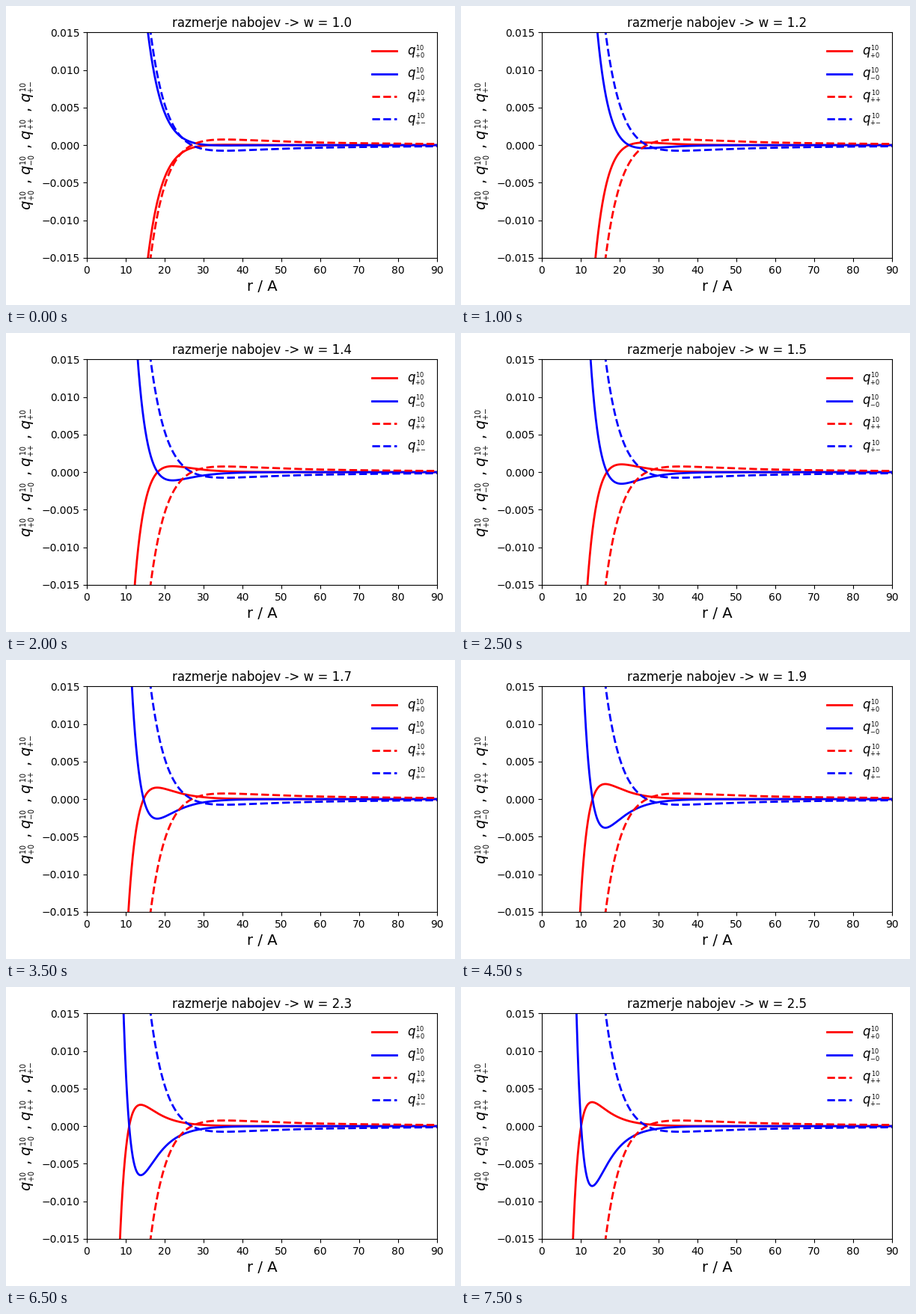
Recreate the animation shown at these times as a matplotlib script. Size 600 px wide and 400 px high, loop 8000 ms.

```python
import numpy as np
import matplotlib.pyplot as plt
from matplotlib.animation import FuncAnimation

FRAMES, INTERVAL = 16, 500
BETA = 0.2165          # screening rate, 1/A
TAIL, CORE = 0.131, 0.895

r = np.linspace(2, 90, 1500)


def neutral(r, w):
    """Response of the + particle next to a neutral one at charge ratio w."""
    slow, fast = np.exp(-BETA * r), np.exp(-w * BETA * r)
    if abs(w - 1) < 1e-9:
        tail = BETA * r * slow
    else:
        tail = (slow - fast) / (w - 1)
    return TAIL * tail - CORE * w * fast


def charged(r):
    """Response of the + particle next to a charged one."""
    return 1.25 / r**2 - 0.849 * np.exp(-r / 4.35)


def label(a, b):
    # small stacked indices
    return rf"$q\genfrac{{}}{{}}{{0}}{{2}}{{10}}{{{{{a}}}{{{b}}}}}$"


plt.rcParams["font.family"] = "DejaVu Sans"
fig, ax = plt.subplots(figsize=(6, 4), dpi=100)
fig.subplots_adjust(left=0.18, right=0.96, bottom=0.158, top=0.9115)

labels = [label(*pair) for pair in ("+0", "-0", "++", "+-")]
plus, = ax.plot(r, neutral(r, 1), "r-", lw=2, label=labels[0])
minus, = ax.plot(r, -neutral(r, 1), "b-", lw=2, label=labels[1])
ax.plot(r, charged(r), "r--", lw=2, label=labels[2])
ax.plot(r, -charged(r), "b--", lw=2, label=labels[3])

ax.set_xlim(0, 90)
ax.set_ylim(-0.015, 0.015)
ax.set_xticks(range(0, 91, 10))
ax.set_xlabel("r / A", fontsize=14)
ax.set_ylabel(" , ".join(labels), fontsize=14)
title = ax.set_title("razmerje nabojev -> w = 1.0", fontsize=12, pad=5)
ax.legend(loc="upper right", fontsize=12, frameon=False)


def update(i):
    w = 1 + 0.1 * i
    y = neutral(r, w)
    plus.set_ydata(y)
    minus.set_ydata(-w * y)
    title.set_text(f"razmerje nabojev -> w = {w:.1f}")
    return plus, minus, title


anim = FuncAnimation(fig, update, frames=FRAMES, interval=INTERVAL,
                     repeat=True, repeat_delay=0)
plt.show()
```
